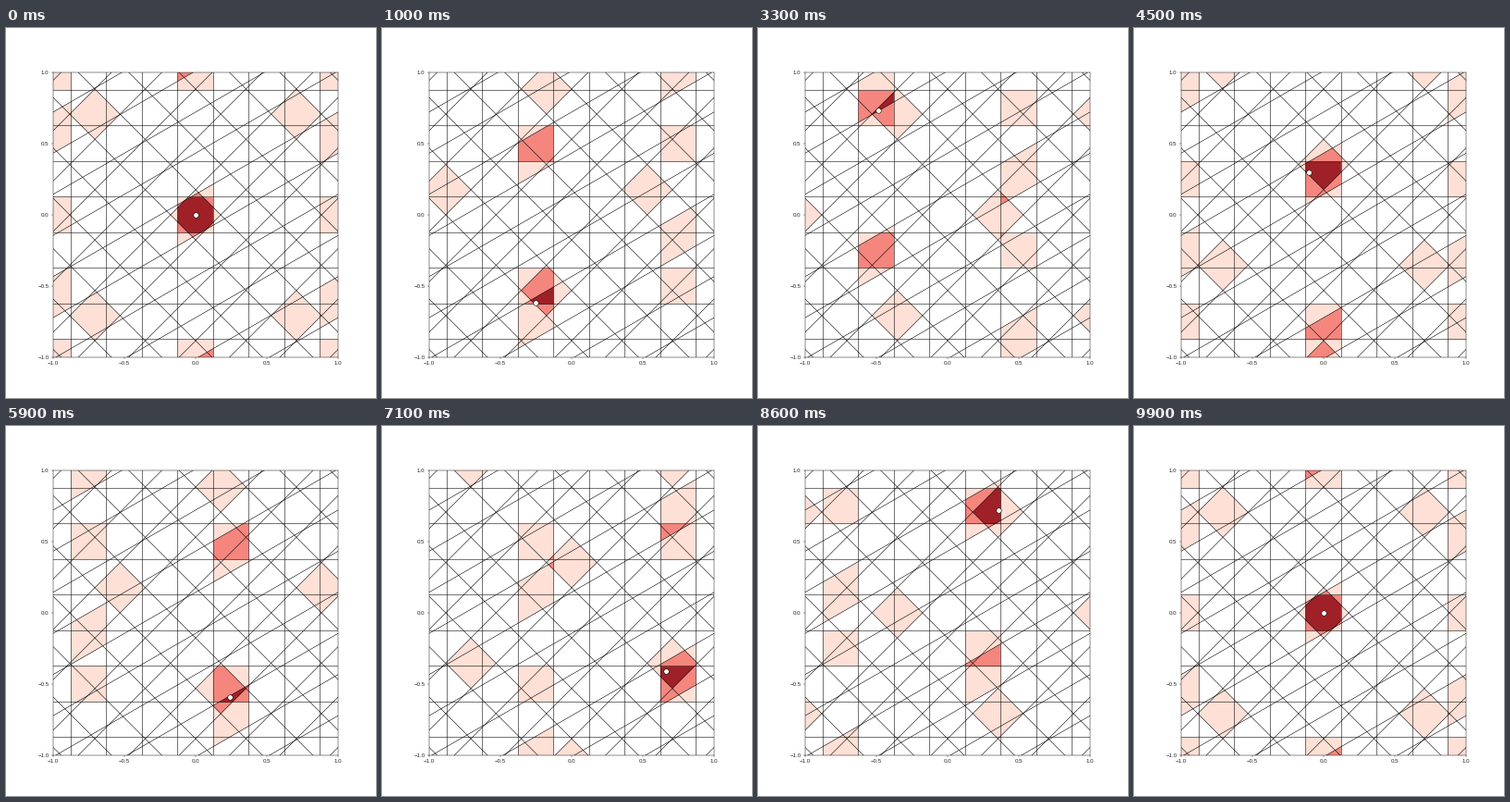
Write a matplotlib script that moves like this. It is 400 px wide and 400 px high and loops after 10 s.

```python
import numpy as np
import matplotlib.pyplot as plt
from matplotlib.animation import FuncAnimation
from matplotlib.collections import LineCollection

FRAMES, INTERVAL = 100, 100
CELLS = 4      # cells per unit period, along each axis of a module
RES = 616      # raster resolution, two samples per screen pixel
COLORS = np.array([[255, 255, 255], [254, 224, 214],
                   [244, 134, 126], [160, 32, 40]], dtype=np.uint8)

plt.rcParams.update({
    "font.family": "Liberation Sans", "font.size": 11,
    "xtick.major.size": 4, "ytick.major.size": 4,
    "xtick.major.pad": 4, "ytick.major.pad": 4,
    "xtick.color": "0.15", "ytick.color": "0.15",
})


def direction(deg):
    a = np.radians(deg)
    return np.array([np.cos(a), np.sin(a)])


# Each module is a pair of unit normals to its two families of lines.
MODULES = [np.array([direction(a), direction(b)])
           for a, b in ((0, 90), (45, 135), (0, 120))]


def phase(module, points):
    return np.floor(points @ module.T * CELLS + 0.5).astype(int) % CELLS


def position(i):
    """Point on a stretched lemniscate, starting at its crossing."""
    t = np.pi / 2 + 2 * np.pi * i / (FRAMES - 1)
    x = 0.5 * np.sqrt(2) * np.cos(t) / (1 + np.sin(t) ** 2)
    return np.array([x, 3 * x * np.sin(t)])


def grid_lines():
    offsets = (np.arange(-8, 8) + 0.5) / CELLS
    normals = [direction(a) for a in (0, 90, 45, 135, 120)]
    return [[c * n - 4 * np.array([-n[1], n[0]]),
             c * n + 4 * np.array([-n[1], n[0]])]
            for n in normals for c in offsets]


axis = -1 + (np.arange(RES) + 0.5) * 2 / RES
field = np.stack(np.meshgrid(axis, axis), axis=-1)
field_phases = [phase(m, field) for m in MODULES]


def overlap(p):
    return sum((f == phase(m, p)).all(axis=-1).astype(int)
               for m, f in zip(MODULES, field_phases))


fig, ax = plt.subplots(figsize=(10, 10), dpi=40)
image = ax.imshow(COLORS[overlap(position(0))], origin="lower",
                  extent=(-1, 1, -1, 1), zorder=0)
lines = LineCollection(grid_lines(), colors="black", linewidths=1, zorder=1)
lines.set_snap(False)
ax.add_collection(lines)
dot, = ax.plot([0], [0], "o", ms=10, mfc="white", mec="black", mew=1,
               snap=False, zorder=3)
ax.set(xlim=(-1, 1), ylim=(-1, 1), aspect="equal")
ticks = np.linspace(-1, 1, 5)
ax.set_xticks(ticks)
ax.set_yticks(ticks)


def update(i):
    p = position(i)
    image.set_data(COLORS[overlap(p)])
    dot.set_data([p[0]], [p[1]])
    return image, dot


anim = FuncAnimation(fig, update, frames=FRAMES, interval=INTERVAL,
                     repeat=True, repeat_delay=0)
plt.show()
```
